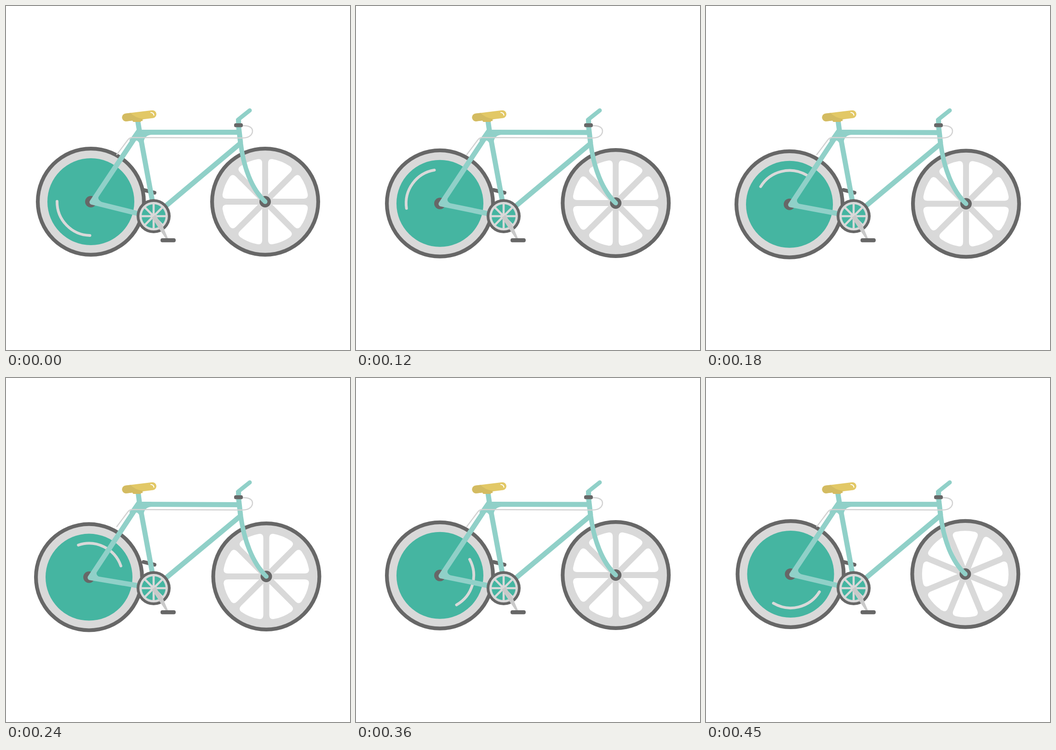
Recreate the animation shown at these times as an HTML page. Size 748 by 748 pixels, loop 0.48 s.

```html
<!DOCTYPE html>
<html lang="en">
<head>
<meta charset="utf-8">
<title>Bicycle</title>
<style>
  html, body { margin: 0; width: 100%; height: 100%; overflow: hidden; background: #fff; }
  svg { display: block; width: 100vw; height: 100vh; }
  .dark { fill: #676767; }
  .grey { fill: #d9d9d9; }
  .teal { fill: #45b5a1; }
  .tube { fill: none; stroke: #90d0c8; stroke-width: 11; }
  .plate { fill: #90d0c8; }
  .line { fill: none; stroke: #d9d9d9; stroke-linecap: round; }
</style>
</head>
<body>
<svg viewBox="0 0 748 748">
  <path d="M299 400L323 406" stroke="#676767" stroke-width="8" stroke-linecap="round"/>

  <g id="rear">
    <circle class="dark" r="119.5"/>
    <circle class="grey" r="111.3"/>
    <circle class="teal" r="94.5"/>
    <path id="shine" class="line" stroke-width="6" d="M-73.5 -.8A73.5 73.5 0 0 0 -2 73.5"/>
    <circle class="dark" r="12.5"/>
  </g>

  <g id="front">
    <circle class="dark" r="119.5"/>
    <circle class="grey" r="111.3"/>
    <g id="holes" fill="#fff"></g>
    <circle class="dark" r="12.5"/>
  </g>

  <path id="down" class="tube" stroke-width="12"/>
  <path id="top" class="tube"/>
  <path id="seatTube" class="tube"/>
  <path id="stays" class="tube" stroke-linejoin="round"/>
  <path id="corner" class="plate"/>
  <path class="plate" d="M284 269H316V280Q301 281 299 297H289Q284 288 277 297L268 292Z"/>
  <path id="fork" class="tube" stroke-linecap="round" style="stroke-width:10"/>
  <path class="tube" d="M530 227L505 247" stroke-linecap="round" style="stroke-width:9"/>
  <path id="head" class="tube"/>

  <path class="line" stroke-width="2.5" style="stroke:#d2d2d2"
    d="M241 323L265 291Q269 286 276 286L514 287C532 287 536 277 536 272C536 264 528 260 514 260"/>
  <rect class="dark" x="496" y="255" width="19" height="8.5" rx="3.5"/>

  <path d="M275 243H297V250H294L293 252H277L275 250Z" fill="#d3bb61"/>
  <path d="M260.7 242.3L318.5 235.2" stroke="#e2c866" stroke-width="17" stroke-linecap="round"/>
  <path d="M271 232.6Q280 243.5 300 246L262 250.7A8.5 8.5 0 0 1 259.6 233.9Z" fill="#d3bb61"/>
  <path d="M315 231.5Q321 232 321.5 237.5" fill="none" stroke="#fff" stroke-width="2" stroke-linecap="round"/>

  <g transform="translate(321 457)">
    <circle class="dark" r="37"/>
    <circle class="grey" r="31"/>
    <circle class="teal" r="26"/>
    <path id="ringSpokes" class="line" stroke-width="4.6"/>
    <circle class="grey" r="6"/>
    <path d="M-4 3L4 -3L20 22L31 48H26L13 29Z" fill="#c9c9c9"/>
  </g>
  <rect class="dark" x="336" y="505" width="33" height="8.7" rx="4"/>
</svg>
<script>
  const STEP = 30, STEPS = 16;
  const el = id => document.getElementById(id);
  const draw = (id, d) => el(id).setAttribute('d', d);
  const place = (id, x, y) => el(id).setAttribute('transform', `translate(${x} ${y})`);
  const turn = (id, deg) => el(id).setAttribute('transform', `rotate(${deg})`);

  // Point at a radius and an angle in degrees
  const polar = (r, deg) => {
    const a = deg * Math.PI / 180;
    return `${(r * Math.cos(a)).toFixed(2)} ${(r * Math.sin(a)).toFixed(2)}`;
  };

  // One opening between two spokes, with rounded outer corners
  const hole = `M17 0L${polar(84, -18.1)}Q${polar(94, -18.5)} ${polar(94, -12.6)}`
    + `A94 94 0 0 1 ${polar(94, 12.6)}Q${polar(94, 18.5)} ${polar(84, 18.1)}Z`;
  const eight = [...Array(8).keys()].map(i => i * 45);
  el('holes').innerHTML = eight.map(a => `<path d="${hole}" transform="rotate(${a + 22.5})"/>`).join('');
  draw('ringSpokes', eight.map(a => `M0 0L${polar(27, a)}`).join(''));

  function pose(n) {
    const k = 1 - Math.abs(1 - n / 8);
    const rx = 184.5 - 4 * k, ry = 425.5 + 7.6 * k;
    const fx = 563.5 + 2.5 * k, fy = 425.5 + 6 * k;

    place('rear', rx, ry);
    place('front', fx, fy);
    turn('shine', n * 20);
    turn('holes', n * 22.5);

    const hx = rx + 2.5, hy = ry + 1;
    draw('stays', `M286 278L${hx} ${hy}L290 452`);
    draw('corner', `M${hx} ${hy}L${hx + 17} ${hy - 18}Q${hx + 9} ${hy - 6} ${hx + 21} ${hy - 1}Z`);
    draw('seatTube', `M${286.5 + k} 250L290.5 274L319 428`);
    draw('top', `M288 274.5L508 ${274.5 + k}`);
    draw('down', `M511 ${297.5 + 1.5 * k}L321 457`);
    draw('head', `M505.5 245L506 264L510 ${298 + k}`);
    draw('fork', `M510 ${296 + k}C${516 + k} ${350 + 2 * k} ${534 + 2 * k} ${398 + 4 * k} ${fx} ${fy}`);
  }

  const start = performance.now();
  function tick() {
    pose(Math.floor((performance.now() - start) / STEP) % STEPS);
    requestAnimationFrame(tick);
  }
  tick();
</script>
</body>
</html>
```
